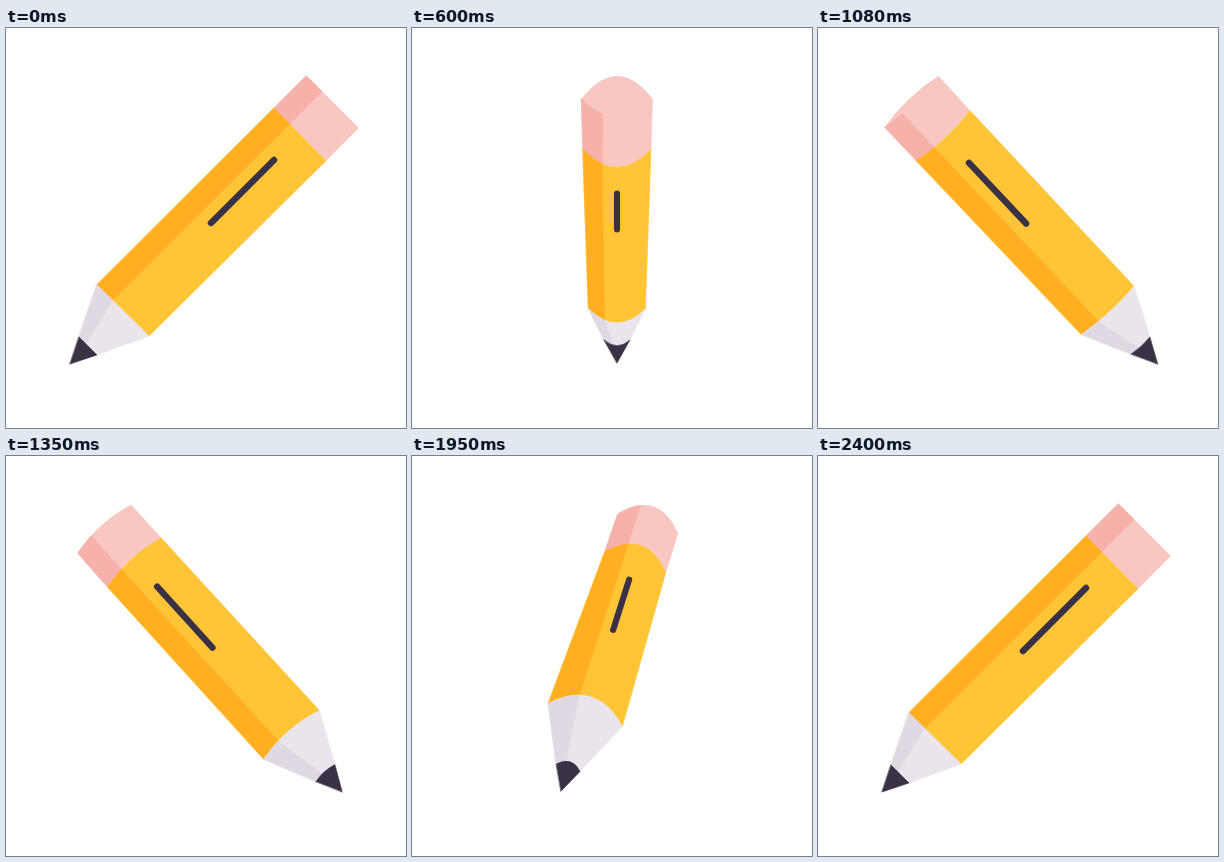
An HTML page with a canvas for the animation above (2.43 s loop, 400 by 400 pixels).

```html
<!DOCTYPE html>
<html>
<head>
<meta charset="utf-8">
<style>
html, body { margin: 0; width: 100%; height: 100%; overflow: hidden; background: #fff; }
canvas { display: block; width: 400px; height: 400px; }
</style>
</head>
<body>
<canvas id="stage"></canvas>
<script>
const canvas = document.getElementById('stage');
const ctx = canvas.getContext('2d');
const ratio = window.devicePixelRatio || 1;
canvas.width = canvas.height = 400 * ratio;

const LOOP = 2430, HALF_TURN = 1200, STEP = 30, AXIS = 205;
const INK = '#3a3244';

// Each ring: flat pose [offset x, y, half width, half height], shade share,
// then the change at full depth with the tip away and with the tip near:
// [offset x, y, half width, half height, arc bulge, shade share].
const RINGS = {
  end:   { flat: [121.5, 74, 26, 26], shade: .3,
           away: [-58, -3, 9.5, 8, -17.8, 0], near: [-52, -7.5, 4.6, -1.5, 20.5, 0] },
  band:  { flat: [89, 106.5, 26, 26.2], shade: .3,
           away: [-66, 15, 8, 0, -17.8, -.02], near: [-51, 0, 5.2, 0, 20.5, 0] },
  wood:  { flat: [-88, 282.5, 26, 25.5], shade: .3,
           away: [-10, -1.5, 2.4, -3, -14, -.02], near: [10, -28, 13, 4, 21.5, .06] },
  lead:  { flat: [-123, 318, 9, 9], shade: .38,
           away: [0, -6, 4, 0, -5.7, 0], near: [0, -7.5, 3.4, .5, 7.2, -.04] }
};
const MARK = { flat: [31.5, 163.5, 31.5, 31.5],
               away: [-56, 20, -19, -13.5], near: [-25, -17.5, -13.5, -7.6] };

const mix = (a, b, k) => [a[0] + (b[0] - a[0]) * k, a[1] + (b[1] - a[1]) * k];

// Cubic ease in and out with handles at .39 and .61
function ease(x) {
  let lo = 0, hi = 1;
  for (let i = 0; i < 24; i++) {
    const s = (lo + hi) / 2, r = 1 - s;
    if (3 * r * r * s * .39 + 3 * r * s * s * .61 + s * s * s < x) lo = s; else hi = s;
  }
  return lo * lo * (3 - 2 * lo);
}

function arc(mid, half, bulge, shade) {
  const len = Math.hypot(half[0], half[1]);
  const left = [mid[0] - half[0], mid[1] - half[1]];
  const right = [mid[0] + half[0], mid[1] + half[1]];
  const ctrl = [mid[0] + 2 * bulge * half[1] / len, mid[1] - 2 * bulge * half[0] / len];
  const cutCtrl = mix(left, ctrl, shade);
  const cut = mix(cutCtrl, mix(ctrl, right, shade), shade);
  return { left, right, ctrl, cut, cutCtrl };
}

function poseRing(ring, side, c, depth) {
  const d = ring[side];
  const [x, y, w, h] = ring.flat.map((v, i) => v + d[i] * depth);
  const mid = [AXIS + x * c, y], half = [w, h * c];
  const bulge = Math.pow(depth, .75);
  const shade = ring.shade + d[5] * depth;
  return {
    front: arc(mid, half, d[4] * bulge, shade),
    outer: arc(mid, half, 22.8 * bulge, shade)
  };
}

function fill(color, seam) {
  ctx.fillStyle = ctx.strokeStyle = color;
  ctx.fill();
  if (seam) {
    ctx.lineWidth = .6;
    ctx.stroke();
  }
}

function band(a, b, color) {
  ctx.beginPath();
  ctx.moveTo(...a.left);
  ctx.quadraticCurveTo(...a.ctrl, ...a.right);
  ctx.lineTo(...b.right);
  ctx.quadraticCurveTo(...b.ctrl, ...b.left);
  ctx.closePath();
  fill(color, true);
}

function shadeBand(a, b, color) {
  ctx.beginPath();
  ctx.moveTo(...a.left);
  ctx.quadraticCurveTo(...a.cutCtrl, ...a.cut);
  ctx.lineTo(...b.cut);
  ctx.quadraticCurveTo(...b.cutCtrl, ...b.left);
  ctx.closePath();
  fill(color, true);
}

function drawMark(side, c, depth) {
  const [x, y, w, h] = MARK.flat.map((v, i) => v + MARK[side][i] * depth);
  const mx = AXIS + x * c;
  ctx.beginPath();
  ctx.moveTo(mx - w * c, y + h);
  ctx.lineTo(mx + w * c, y - h);
  ctx.strokeStyle = INK;
  ctx.lineWidth = 6.5 - .4 * depth;
  ctx.lineCap = 'round';
  ctx.stroke();
}

function draw(ms) {
  const t = Math.min(Math.floor((ms % LOOP) / STEP) * STEP, 2 * HALF_TURN);
  const side = t < HALF_TURN ? 'away' : 'near';
  const swing = 1 - 2 * ease((t % HALF_TURN) / HALF_TURN);
  const c = side === 'away' || t === 2 * HALF_TURN ? swing : -swing;
  const depth = Math.max(0, 1 - c * c);
  const pose = name => poseRing(RINGS[name], side, c, depth);
  const end = pose('end'), top = pose('band').front;
  const wood = pose('wood').front, lead = pose('lead').front;

  ctx.setTransform(ratio, 0, 0, ratio, 0, 0);
  ctx.fillStyle = '#fff';
  ctx.fillRect(0, 0, 400, 400);
  ctx.lineJoin = 'round';

  band(side === 'away' ? end.outer : end.front, top, '#f8c7c1');
  shadeBand(end.front, top, '#f5b1aa');
  band(top, wood, '#ffc537');
  shadeBand(top, wood, '#ffaf20');
  band(wood, lead, '#eae4ec');
  shadeBand(wood, lead, '#e0d8e3');

  ctx.beginPath();
  ctx.moveTo(...lead.left);
  ctx.quadraticCurveTo(...lead.ctrl, ...lead.right);
  ctx.lineTo(AXIS - 141 * c, 336 - depth);
  ctx.closePath();
  fill(INK, true);

  drawMark(side, c, depth);
}

let start;
function tick(now) {
  if (start === undefined) start = now;
  draw(now - start);
  requestAnimationFrame(tick);
}
draw(0);
requestAnimationFrame(tick);
</script>
</body>
</html>
```
